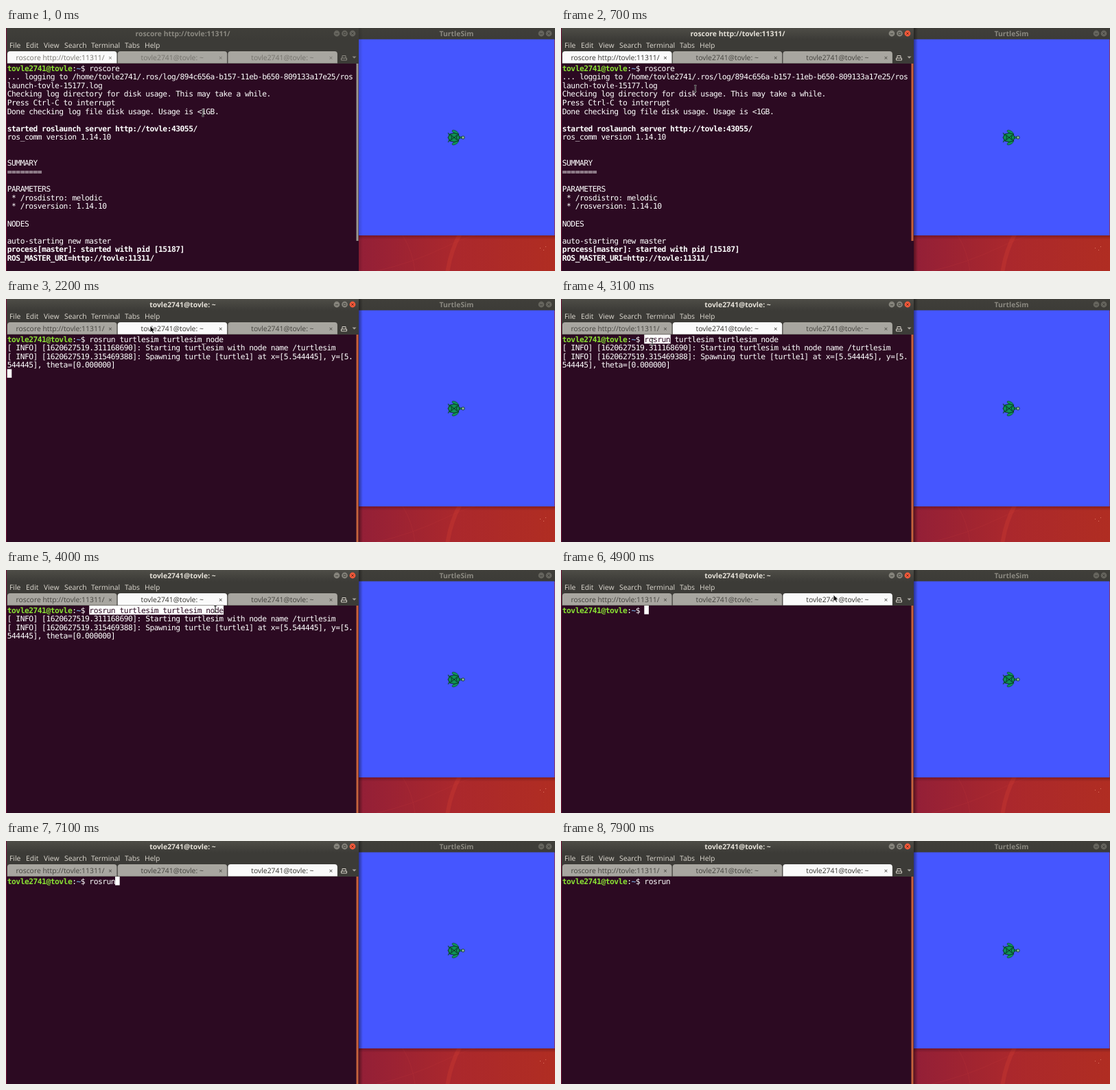
An HTML page with a canvas for the animation above (8 s loop, 800 by 355 pixels).

```html
<!DOCTYPE html>
<html lang="en">
<head>
<meta charset="utf-8">
<title>Terminal and turtle</title>
<style>
html, body { margin: 0; width: 100%; height: 100%; overflow: hidden; background: #2c0a22; }
canvas { display: block; }
</style>
</head>
<body>
<canvas id="stage" width="800" height="355"></canvas>
<script>
const ctx = document.getElementById('stage').getContext('2d');
ctx.textRendering = 'geometricPrecision';

const LOOP = 8000, STEP = 100;
const CELL = 6.295, ROW = 12.61, LEFT = 2, TOP = 52;
const MONO = '"DejaVu Sans Mono", monospace';
const SANS = '"Open Sans", "Noto Sans", sans-serif';
const WHITE = '#fff', PLUM = '#2c0a22', CHROME = '#3c3b37', DIM = '#8b8981';
const USER = 'tovle2741@tovle', PROMPT = USER.length + 4;

const MASTER = `... logging to /home/tovle2741/.ros/log/894c656a-b157-11eb-b650-809133a17e25/ros
launch-tovle-15177.log
Checking log directory for disk usage. This may take a while.
Press Ctrl-C to interrupt
Done checking log file disk usage. Usage is <1GB.

*started roslaunch server http://tovle:43055/
ros_comm version 1.14.10


SUMMARY
========

PARAMETERS
 * /rosdistro: melodic
 * /rosversion: 1.14.10

NODES

auto-starting new master
*process[master]: started with pid [15187]
*ROS_MASTER_URI=http://tovle:11311/`.split('\n');

const NODE = `[ INFO] [1620627519.311168690]: Starting turtlesim with node name /turtlesim
[ INFO] [1620627519.315469388]: Spawning turtle [turtle1] at x=[5.544445], y=[5.
544445], theta=[0.000000]`.split('\n');

const RUN = 'rosrun turtlesim turtlesim_node';
const TITLES = ['roscore http://tovle:11311/', USER + ': ~', USER + ': ~'];

// Pointer path: time, x, y
const PATH = [
  [0, 287, 124], [300, 287, 124], [900, 150, 71], [1400, 150, 71],
  [1500, 132, 57], [1700, 132, 57], [1900, 238, 46], [2000, 211, 44],
  [2200, 211, 44], [2800, 140, 70], [3000, 140, 70], [3100, 133, 62],
  [3200, 133, 62], [4000, 305, 57], [4200, 305, 57], [4500, 403, 40],
  [4600, 398, 41], [4900, 398, 41], [5100, 296, 100], [5400, 296, 100],
  [5500, 292, 101], [LOOP, 292, 101]
];

function pointerAt(t) {
  const i = PATH.findIndex(p => p[0] > t);
  const [t0, x0, y0] = PATH[i - 1], [t1, x1, y1] = PATH[i];
  const k = (t - t0) / (t1 - t0);
  return { x: x0 + (x1 - x0) * k, y: y0 + (y1 - y0) * k };
}

function box(x, y, w, h, fill) {
  ctx.fillStyle = fill;
  ctx.fillRect(x, y, w, h);
}

function gradient(x0, y0, x1, y1, ...colors) {
  const g = ctx.createLinearGradient(x0, y0, x1, y1);
  colors.forEach((c, i) => g.addColorStop(i / (colors.length - 1), c));
  return g;
}

function shape(path, fill, stroke, width = 1) {
  const p = new Path2D(path);
  if (fill) { ctx.fillStyle = fill; ctx.fill(p); }
  if (stroke) { ctx.strokeStyle = stroke; ctx.lineWidth = width; ctx.stroke(p); }
}

function disc(x, y, r, fill, stroke) {
  ctx.beginPath();
  ctx.arc(x, y, r, 0, 7);
  ctx.fillStyle = fill;
  ctx.fill();
  if (stroke) { ctx.strokeStyle = stroke; ctx.lineWidth = 0.8; ctx.stroke(); }
}

function label(text, x, y, color, { bold = false, align = 'center', size = 10.4 } = {}) {
  ctx.font = `${bold ? 'bold ' : ''}${size}px ${SANS}`;
  ctx.textAlign = align;
  ctx.fillStyle = color;
  ctx.fillText(text, x, y);
}

function print(text, col, row, color = WHITE, bold = false) {
  ctx.font = `${bold ? 'bold ' : ''}11.3px ${MONO}`;
  ctx.textAlign = 'center';
  ctx.fillStyle = color;
  [...text].forEach((c, i) =>
    ctx.fillText(c, LEFT + (col + i + 0.5) * CELL, TOP + 10.6 + row * ROW));
}

function caret(col, row) {
  box(LEFT + col * CELL - 0.3, TOP + row * ROW, CELL + 0.3, ROW, WHITE);
}

function command(text, selected = 0) {
  print(USER, 0, 0, '#8ae234', true);
  print(':', USER.length, 0);
  print('~', USER.length + 1, 0, '#729fcf', true);
  print('$', USER.length + 2, 0);
  if (selected) box(LEFT + PROMPT * CELL - 0.3, TOP, selected * CELL + 0.6, ROW + 0.6, WHITE);
  print(text.slice(0, selected), PROMPT, 0, PLUM);
  print(text.slice(selected), PROMPT + selected, 0);
}

function output(lines) {
  lines.forEach((line, i) => {
    const bold = line[0] === '*';
    print(bold ? line.slice(1) : line, 0, i + 1, WHITE, bold);
  });
}

function windowButton(x, kind, focused) {
  const hot = focused && kind === 'close';
  disc(x, 8, 4.4, hot ? '#f0593a' : focused ? '#85837b' : '#65645d');
  const marks = {
    min: `M${x - 2} 8.5h4`,
    max: `M${x - 1.6} 6.4h3.2v3.2h-3.2z`,
    close: `M${x - 1.6} 6.4l3.2 3.2m0 -3.2l-3.2 3.2`
  };
  shape(marks[kind], null, hot ? '#5a2316' : CHROME, 0.8);
}

function titleBar(x, w, focused) {
  box(x, 0, w, 17, gradient(0, 0, 0, 17, focused ? '#4e4d47' : '#403f3a', CHROME));
}

function desktop() {
  box(0, 0, 800, 355, gradient(514, 0, 800, 0, '#931f37', '#ab282c', '#b02d22'));
  box(0, 0, 2, 355, '#6d1034');
  shape('M643 358Q648 325 662 300', null, 'rgba(205,60,50,.35)', 6);
  shape('M540 355Q590 344 640 320T700 303M578 303Q592 325 596 355', null, 'rgba(200,60,60,.2)', 1);
  for (const [x, y] of [[778, 321], [783, 324], [786, 319]]) box(x, y, 1, 1, 'rgba(255,170,140,.6)');
  box(514, 303, 286, 6, gradient(0, 303, 0, 309, 'rgba(40,0,10,.3)', 'rgba(40,0,10,0)'));
}

function turtle() {
  const green = '#0f9156', dark = '#0a3020';
  ctx.save();
  ctx.translate(653, 160);
  for (const side of [1, -1]) {
    ctx.save();
    ctx.scale(1, side);
    shape('M0 -7Q-5 -9 -2 -11Q4 -11 7 -5L4 -4Z', green, dark, 0.5);
    shape('M-5 -4L-9 -7L-7 -2Z', green, dark, 0.5);
    ctx.restore();
  }
  shape('M7 -1.2H11V1.2H7Z', green, dark, 0.5);
  disc(13, 0, 2.2, '#8fb8a0', dark);
  shape('M-9 0L-6 -5L0 -6.5L6 -5L8 0L6 5L0 6.5L-6 5Z', green, dark, 1);
  shape('M-6 -5L-3 0L-6 5M6 -5L3 0L6 5M-4 -3.5L4 3.5M-4 3.5L4 -3.5', null, dark, 1);
  ctx.restore();
}

function turtleWindow(terminalFocused) {
  titleBar(514, 286, false);
  label('TurtleSim', 656.5, 12, DIM, { bold: true });
  windowButton(780, 'min', false);
  windowButton(791, 'close', false);
  box(514, 16.5, 285.3, 286.5, '#4556ff');
  turtle();
  const shade = terminalFocused ? 0.4 : 0.15;
  box(514, 0, 6, 355, gradient(514, 0, 520, 0, `rgba(0,0,0,${shade})`, 'rgba(0,0,0,0)'));
}

function terminalChrome(active, focused) {
  titleBar(1, 513, focused);
  box(1, 17, 513, 35, CHROME);
  label(TITLES[active], 257.5, 12, focused ? '#e6e2d9' : DIM, { bold: true });
  windowButton(482, 'min', focused);
  windowButton(493.5, 'max', focused);
  windowButton(505, 'close', focused);
  [['File', 5], ['Edit', 29], ['View', 55], ['Search', 85], ['Terminal', 124], ['Tabs', 173], ['Help', 202]]
    .forEach(([name, x]) => label(name, x, 29, '#dfdbd2', { align: 'left' }));
  const idleInk = focused ? '#43423d' : '#74726c';
  TITLES.forEach((title, i) => {
    const x = 2 + i * 160.7, on = i === active;
    const ink = on && focused ? '#33322e' : idleInk;
    ctx.beginPath();
    ctx.roundRect(x, 34, 159.5, 17.5, [4, 4, 0, 0]);
    ctx.fillStyle = on ? '#fafafa' : '#a8a6a0';
    ctx.fill();
    label(title, x + (i ? 79.5 : 77), 47, ink);
    label('×', x + 150, 46.5, ink, { size: 9.5 });
  });
  shape('M490 44V40.5H495V44M488.5 44H496.5V47H488.5Z', null, focused ? '#d5d1c8' : DIM, 1);
  shape('M504.5 41.5H510.5L507.5 44.5Z', focused ? '#a8a6a0' : DIM);
}

function selectedChars(active, t, pointer) {
  if (active === 0) return t >= 1500 ? 'roscore'.length : 0;
  if (t < 3100) return 0;
  if (t >= 4000) return RUN.length;
  const col = Math.floor((pointer.x - LEFT) / CELL) - PROMPT;
  const end = RUN.indexOf(' ', Math.max(col, 0));
  return end < 0 ? RUN.length : end;
}

function terminalBody(active, t, pointer, focused) {
  box(1, TOP, 513, 303, PLUM);
  box(510.5, TOP, 3, active ? 303 : 259, focused ? '#c8623c' : '#9b9891');
  if (active === 0) {
    command('roscore', selectedChars(0, t, pointer));
    output(MASTER);
  } else if (active === 1) {
    command(RUN, selectedChars(1, t, pointer));
    output(NODE);
    if (Math.floor((t - 2200) / 600) % 2 === 0) caret(0, 4);
  } else {
    const typed = t < 6100 ? 0 : Math.min(7, 1 + Math.floor((t - 6100) / 200));
    command('rosrun '.slice(0, typed));
    const blank = (t >= 5400 && t < 6000) || t >= 7900;
    if (!blank) caret(PROMPT + typed, 0);
  }
}

function drawPointer({ x, y }) {
  ctx.save();
  ctx.translate(x, y);
  ctx.lineJoin = 'round';
  if (y < TOP) {
    shape('M-1 -5V5L1.3 3L3 6.3L4.7 5.5L3.2 2.3H6Z', '#111', '#fff', 0.9);
  } else {
    const beam = 'M-1.7 -4.5H1.7M0 -4.5V4.5M-1.7 4.5H1.7';
    shape(beam, null, '#ccc', 1.8);
    shape(beam, null, '#111', 0.9);
  }
  ctx.restore();
}

function draw(now) {
  const t = Math.floor((now % LOOP) / STEP) * STEP;
  const active = t < 2200 ? 0 : t < 4900 ? 1 : 2;
  const focused = t >= 100;
  const pointer = pointerAt(t);
  desktop();
  turtleWindow(focused);
  terminalChrome(active, focused);
  terminalBody(active, t, pointer, focused);
  if (t < 6100) drawPointer(pointer);
}

let start;
function frame(now) {
  start ??= now;
  draw(now - start);
  requestAnimationFrame(frame);
}
requestAnimationFrame(frame);
</script>
</body>
</html>
```
